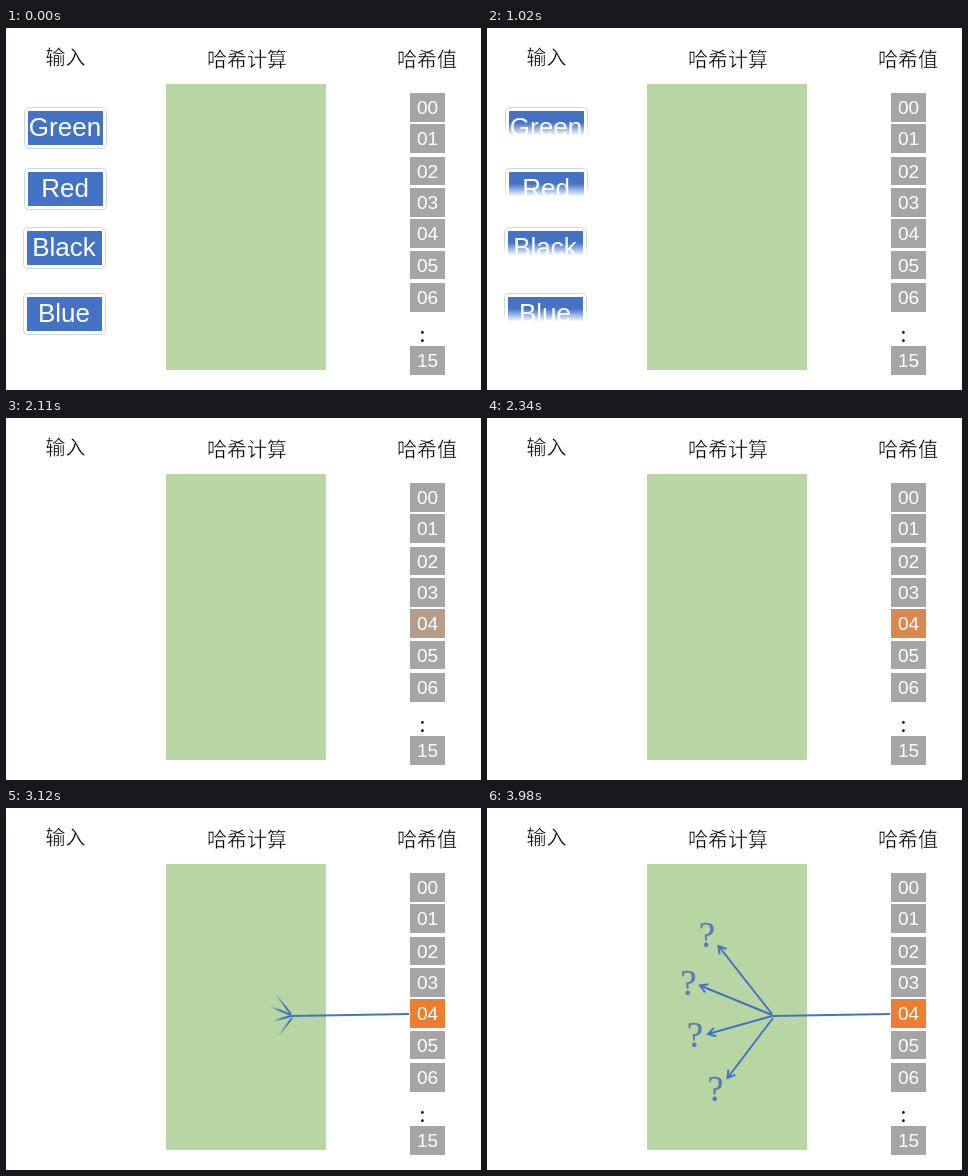
Animation, 475 px wide and 362 px high, one loop 5.45 s. Source, as an HTML page:

```html
<!DOCTYPE html>
<html lang="zh">
<head>
<meta charset="utf-8">
<title>哈希计算</title>
<style>
  html, body { margin: 0; width: 100%; height: 100%; overflow: hidden; background: #fff; }
  svg { display: block; width: 475px; height: 362px; }
  text { text-anchor: middle; }
  .title { font: 300 20px "Noto Sans CJK SC", "Noto Sans CJK", sans-serif; stroke: #fff; stroke-width: .4; }
  .colon { font: 23px "Liberation Serif", serif; }
  .word { font: 26px "Liberation Sans", sans-serif; fill: #fff; }
  .slot { font: 19px "Liberation Sans", sans-serif; fill: #fff; }
  .mark { font: 36px "Liberation Serif", serif; fill: #5a7ab5; stroke: #5a7ab5; stroke-width: .3; }
  .line { fill: none; stroke-width: 2; }
</style>
</head>
<body>
<svg id="stage" viewBox="0 0 475 362">
  <defs id="defs">
    <linearGradient id="fade" gradientUnits="userSpaceOnUse" x1="0" x2="0">
      <stop offset="0" stop-color="#fff"/>
      <stop offset="1" stop-color="#fff" stop-opacity="0"/>
    </linearGradient>
    <mask id="wipe" maskUnits="userSpaceOnUse" x="-2" y="-2" width="88" height="48">
      <rect x="-2" y="-2" width="88" height="48" fill="url(#fade)"/>
    </mask>
  </defs>
  <text class="title" x="59.5" y="36.5">输入</text>
  <text class="title" x="241" y="39">哈希计算</text>
  <text class="title" x="421" y="39">哈希值</text>
  <rect x="160" y="56" width="160" height="286" fill="#b8d6a3"/>
  <text class="colon" x="416.5" y="313.5">:</text>
</svg>
<script>
const LOOP = 5450;
const BLUE = '#4472c4';
const BOX_HEIGHT = 42;
const BOX_FEATHER = 13;
const stage = document.getElementById('stage');
const defs = document.getElementById('defs');
const fade = document.getElementById('fade');

// Moments at which the picture is redrawn.
const steps = [0, 840, 930, 1020, 1080, 1160, 2110, 2200,
  2340, 2420, 2500, 2580, 2660, 2750, 2810,
  2890, 2960, 3040, 3120, 3200, 3270, 3350, 3430,
  3520, 3600, 3670, 3750, 3830, 3900, 3980];

const progress = (t, start, length) => Math.min(1, Math.max(0, (t - start) / length));

function add(parent, tag, attrs, text = '') {
  const node = document.createElementNS('http://www.w3.org/2000/svg', tag);
  for (const name in attrs) node.setAttribute(name, attrs[name]);
  node.textContent = text;
  return parent.appendChild(node);
}

function addInput(word, left, top) {
  const box = add(stage, 'g', { transform: `translate(${left} ${top})`, mask: 'url(#wipe)' });
  add(box, 'rect', { x: .5, y: .5, width: 82, height: 41, rx: 4, fill: '#fff', stroke: '#cbd7ee' });
  add(box, 'rect', { x: 4, y: 4, width: 75, height: 34, rx: .5, fill: BLUE });
  add(box, 'text', { class: 'word', x: 41, y: 29 }, word);
  return box;
}

function addSlot(label, top, bottom) {
  const rect = add(stage, 'rect', { x: 404, y: top, width: 35, height: bottom - top, fill: '#a5a5a5' });
  add(stage, 'text', { class: 'slot', x: 421.5, y: top + 21 }, label);
  return rect;
}

// A line revealed from its right end by a soft edge.
function addLine(id, [x1, y1], [x2, y2], feather, head) {
  const gradient = add(defs, 'linearGradient', { id, gradientUnits: 'userSpaceOnUse', y1: 0, y2: 0 });
  add(gradient, 'stop', { offset: 0, 'stop-color': BLUE, 'stop-opacity': 0 });
  add(gradient, 'stop', { offset: 1, 'stop-color': BLUE });
  let d = `M${x1} ${y1}L${x2} ${y2}`;
  if (head) {
    const angle = Math.atan2(y1 - y2, x1 - x2);
    const wing = turn => `${x2 + 8.5 * Math.cos(angle + turn)} ${y2 + 8.5 * Math.sin(angle + turn)}`;
    d += `M${wing(-.54)}L${x2} ${y2}L${wing(.54)}`;
  }
  add(stage, 'path', { class: 'line', d, stroke: `url(#${id})` });
  const right = x1 + 1;
  return p => {
    const front = right - (right - x2 + 2 + feather) * p;
    gradient.setAttribute('x1', front);
    gradient.setAttribute('x2', front + feather);
  };
}

const inputs = [['Green', 18, 79], ['Red', 18, 140], ['Black', 17, 199], ['Blue', 17, 265]]
  .map(box => addInput(...box));
const slots = [[65, 94], [96, 125], [129, 157], [160, 189], [191, 220], [223, 251], [255, 284]]
  .map(([top, bottom], i) => addSlot('0' + i, top, bottom));
addSlot('15', 318, 347);

const showTrunk = addLine('trunk', [403, 206], [285, 208], 18, false);
const showArrows = [
  [[285, 206], [231.5, 138]],
  [[285, 207], [213, 177.5]],
  [[285, 208], [221, 226]],
  [[286, 210], [240.5, 270]]
].map(([from, to], i) => addLine('arrow' + i, from, to, 10, true));

const marks = add(stage, 'g', {});
[[220, 139], [201.5, 187], [208, 239], [228.5, 293]]
  .forEach(([x, y]) => add(marks, 'text', { class: 'mark', x, y }, '?'));

function draw(t) {
  const out = progress(t, 800, 360) ** 1.5;
  const edge = BOX_HEIGHT - (BOX_HEIGHT + BOX_FEATHER) * out;
  fade.setAttribute('y1', edge);
  fade.setAttribute('y2', edge + BOX_FEATHER);
  inputs.forEach(box => box.setAttribute('visibility', out < 1 ? 'visible' : 'hidden'));

  const heat = progress(t, 2005, 450);
  const mix = (a, b) => Math.round(a + (b - a) * heat);
  slots[4].setAttribute('fill', `rgb(${mix(165, 237)},${mix(165, 125)},${mix(165, 49)})`);

  showTrunk(progress(t, 2604, 355));
  showArrows.forEach(show => show(progress(t, 3020, 400)));
  marks.setAttribute('opacity', progress(t, 3470, 500));
}

const begin = performance.now();
function tick() {
  const t = (performance.now() - begin) % LOOP;
  draw(steps.findLast(step => step <= t));
  requestAnimationFrame(tick);
}
tick();
</script>
</body>
</html>
```
